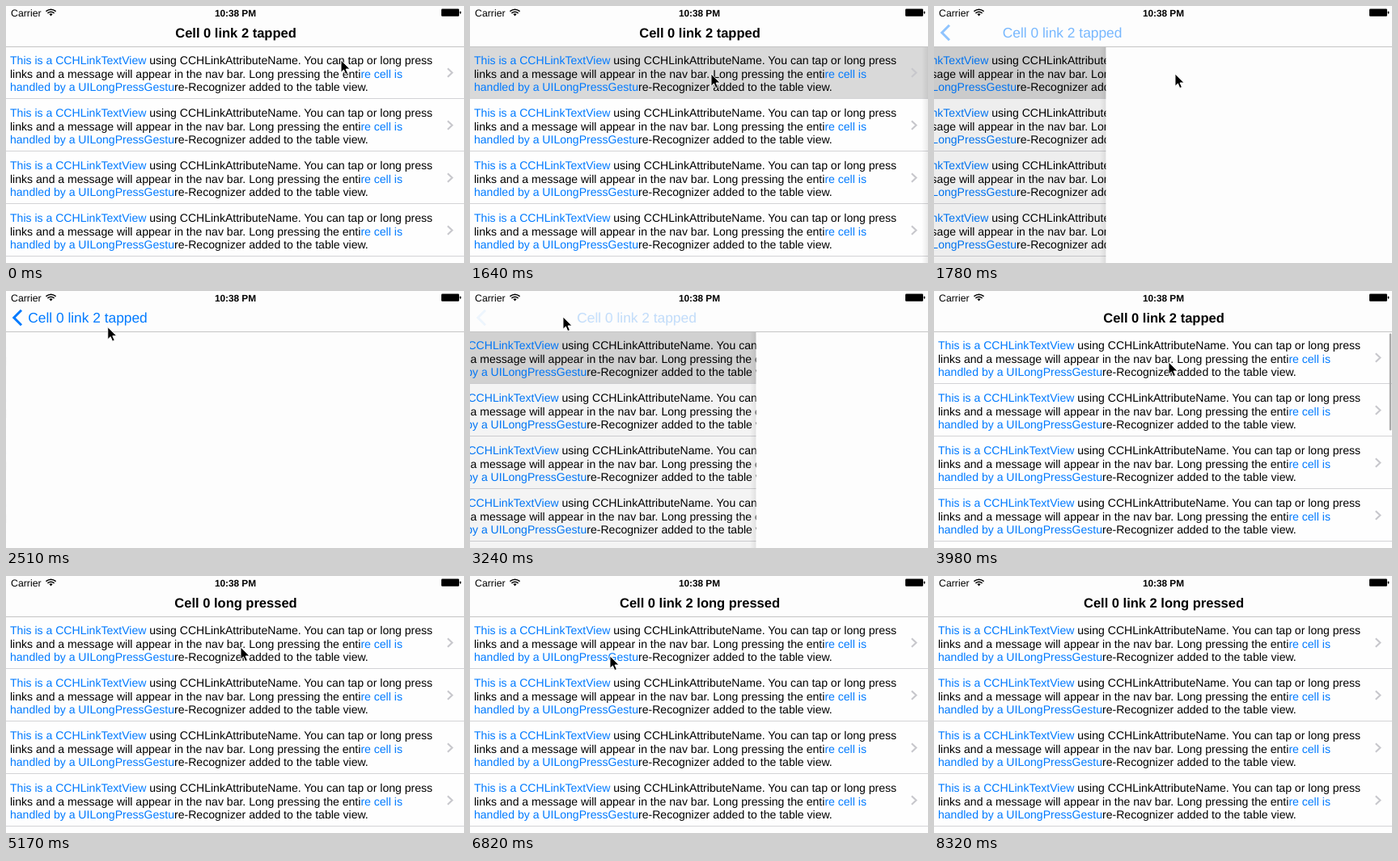
Recreate the animation shown at these times as an HTML page. Size 566 px wide and 318 px high, loop 8.75 s.

```html
<!DOCTYPE html>
<html>
<head>
<meta charset="utf-8">
<style>
html, body { margin: 0; width: 100%; height: 100%; overflow: hidden; background: #fefefe; }
svg { display: block; width: 566px; height: 318px; }
text { font-family: "Liberation Sans", Arial, sans-serif; text-rendering: geometricPrecision; white-space: pre; }
.row { font-size: 14.05px; }
.link, .back { fill: #007aff; }
.back { font-size: 17.35px; }
.title { font-size: 16.5px; font-weight: bold; }
</style>
</head>
<body>
<svg viewBox="0 0 566 318">
  <defs>
    <linearGradient id="shade">
      <stop offset="0" stop-opacity="0"/>
      <stop offset="1" stop-opacity=".08"/>
    </linearGradient>
  </defs>
  <rect width="566" height="318" fill="#fefefe"/>
  <g id="list">
    <rect id="cell" y="51" width="566" height="64" fill="#d9d9d9"/>
    <path id="touch" d="M438 76H530V92.5H438Z M5 92.5H207.5V109H5Z" fill="#aaa"/>
    <g id="rows"></g>
    <rect id="bar" x="562.8" y="52.5" width="2.5" height="120" rx="1.2" fill="#aaa"/>
  </g>
  <rect id="dim" y="51" width="566" height="267"/>
  <g id="detail">
    <rect x="-8" y="51" width="8" height="267" fill="url(#shade)"/>
    <rect y="51" width="566" height="267" fill="#fdfdfd"/>
  </g>
  <rect width="566" height="50" fill="#fdfdfd"/>
  <rect y="50" width="566" height="1" fill="#c4c4c4"/>
  <text x="6" y="12.5" font-size="12.3">Carrier</text>
  <g fill="none" stroke="#000" stroke-width="1.5">
    <path d="M49.4 6.6Q55.5 1.8 61.6 6.6M51.4 8.9Q55.5 5.6 59.6 8.9"/>
    <path d="M53.4 10.1Q55.5 8.4 57.6 10.1L55.5 12.4Z" fill="#000" stroke="none"/>
  </g>
  <text x="283.5" y="12.5" font-size="11.8" font-weight="bold" text-anchor="middle">10:38 PM</text>
  <rect x="538" y="3.5" width="22" height="9.3" rx="1.2"/>
  <rect x="560.8" y="6.6" width="1.5" height="3.2" rx=".7"/>
  <path id="arrow" d="M19 23.7L9.8 33L19 42.3" fill="none" stroke="#007aff" stroke-width="3"/>
  <g id="heading" text-anchor="middle">
    <text id="back" class="back" y="39.4">Cell 0 link 2 tapped</text>
    <text id="title" class="title" y="39.4"></text>
  </g>
  <path id="cursor" d="M0 0V15.2L3.4 12L5.8 17.6L8.4 16.4L6 11H11Z" stroke="#fff" stroke-width=".9"/>
</svg>
<script>
const LOOP = 8750, STEP = 148;
const el = id => document.getElementById(id);
const clamp = v => Math.max(0, Math.min(1, v));
const fade = (id, v) => el(id).setAttribute('opacity', clamp(v));
const move = (id, x, y = 0) => el(id).setAttribute('transform', `translate(${x} ${y})`);

const cellMarkup = y => `<g class="row" transform="translate(0 ${y})">
  <text x="5" y="71.8"><tspan class="link">This is a CCHLinkTextView</tspan> using CCHLinkAttributeName. You can tap or long press</text>
  <text x="5" y="88.6">links and a message will appear in the nav bar. Long pressing the enti<tspan class="link">re cell is</tspan></text>
  <text x="5" y="105.4"><tspan class="link">handled by a UILongPressGestu</tspan>re-Recognizer added to the table view.</text>
  <path d="M545.8 77.2L551.4 82.5L545.8 87.8" fill="none" stroke="#c7c7cc" stroke-width="2.1"/>
  <rect y="114" width="566" height="1" fill="#d3d3d6"/></g>`;
el('rows').innerHTML = [0, 1, 2, 3, 4].map(i => cellMarkup(i * 65)).join('');

// Pointer glides: start time, duration, destination
const glides = [[0, 600, 298, 84], [2070, 730, 115, 32], [3390, 590, 290, 88],
  [5620, 750, 173, 99], [7570, 750, 498, 330]];

// Each glide slows down towards its end, sideways sooner than vertically
function pointer(t) {
  let x = 414, y = 67;
  for (const [start, time, toX, toY] of glides) {
    const left = 1 - clamp((t - start) / time);
    x = toX + (x - toX) * left ** 3;
    y = toY + (y - toY) * left ** 1.5;
  }
  return [x, y];
}

// Critically damped spring from 0 to 1
function spring(ms) {
  const u = Math.max(0, ms) * 0.0143;
  return 1 - (1 + u) * Math.exp(-u);
}

function draw(t) {
  const shot = Math.floor((t + 20) / STEP) * STEP; // moving parts hold between refreshes
  const between = (from, to) => t >= from && t < to;

  // 1: list on screen, 0: detail page on screen
  const shown = t < 3000 ? 1 - spring(shot - 11 * STEP) : spring(shot - 21 * STEP);
  move('list', -0.3 * 566 * (1 - shown));
  move('detail', 566 * shown);
  fade('dim', 0.1 * (1 - shown));
  fade('detail', between(1640, 3900));

  move('heading', 101 + 183 * shown ** 1.18);
  fade('back', 1 - shown * 1.25);
  fade('arrow', 1 - shown * 1.5);
  fade('title', (shown - 0.62) / 0.38);
  el('title').textContent = t < 5170 ? 'Cell 0 link 2 tapped'
    : t < 6820 ? 'Cell 0 long pressed' : 'Cell 0 link 2 long pressed';

  fade('cell', between(4870, 5170) || between(1640, 4000) * (1 - (shot - 3480) / 300));
  fade('touch', between(6370, 6820));
  fade('bar', Math.min((shot - 3450) / 200, (5020 - shot) / 450));
  move('cursor', ...pointer(shot));
}

const start = performance.now();
function frame() {
  draw((performance.now() - start) % LOOP);
  requestAnimationFrame(frame);
}
frame();
</script>
</body>
</html>
```
